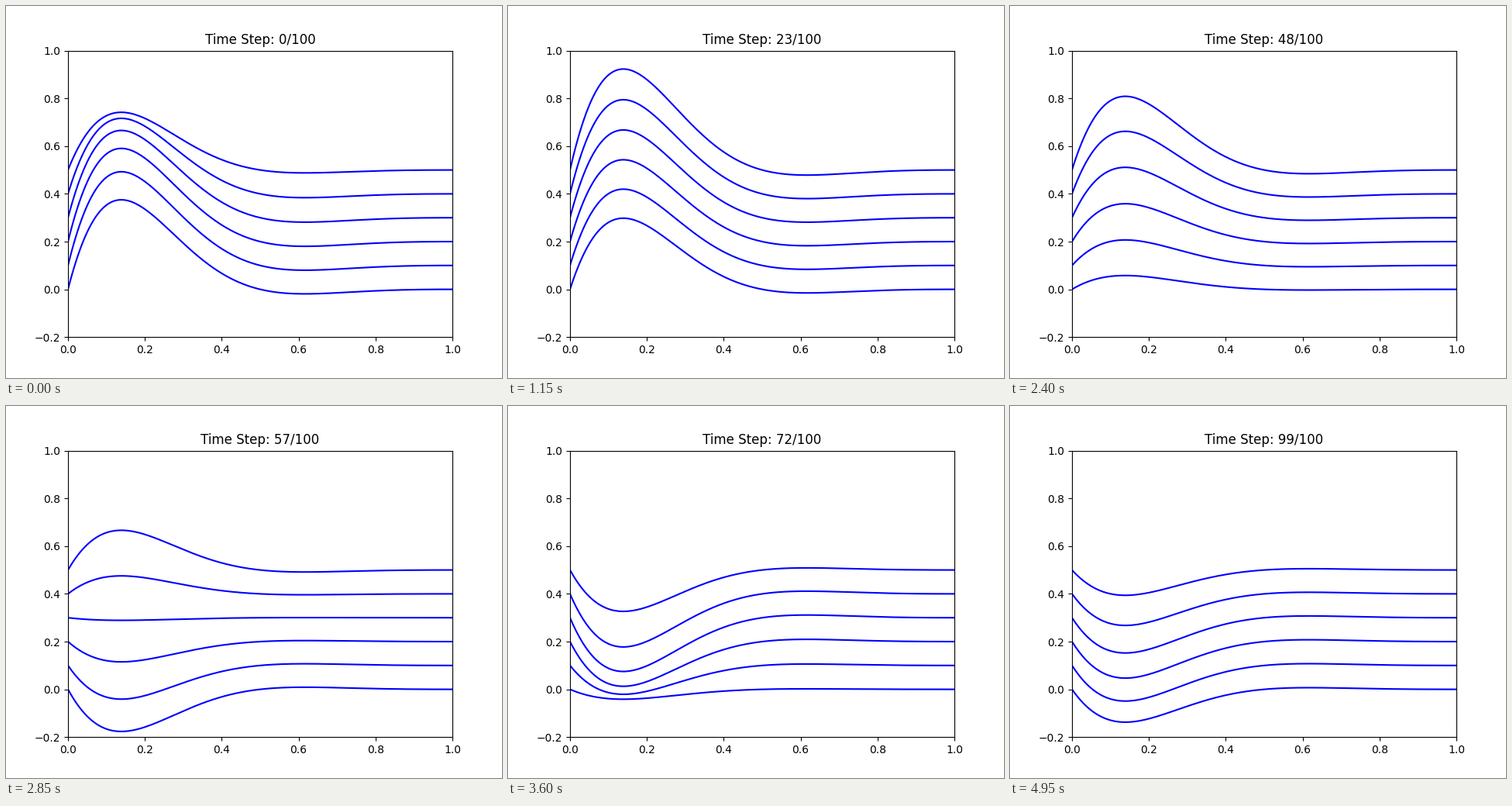
A matplotlib script for the animation above (5 s loop, 640x480 px).

```python
import numpy as np
import matplotlib.pyplot as plt
from matplotlib.animation import FuncAnimation

STEPS = 100
INTERVAL = 50
DELAY = 0.7  # time lag per unit of height

x = np.linspace(0, 1, 200)
profile = np.sin(2 * np.pi * x) * np.exp(-5 * x) * (1 - x**2)
levels = np.arange(6) * 0.1


def amplitude(t, level):
    """Damped wave with a slowly modulated frequency, delayed by height."""
    lag = t - DELAY * level
    omega = np.pi * (1 - np.sin(2 * np.pi * t))
    return np.exp(-lag) * np.cos(omega * lag)


fig, ax = plt.subplots(figsize=(6.4, 4.8), dpi=100)
ax.set_xlim(0, 1)
ax.set_ylim(-0.2, 1)
title = ax.set_title("")
lines = [ax.plot([], [], color="blue", lw=1.5)[0] for _ in levels]


def update(step):
    t = step / STEPS
    for line, level in zip(lines, levels):
        line.set_data(x, level + amplitude(t, level) * profile)
    title.set_text(f"Time Step: {step}/{STEPS}")
    return [*lines, title]


anim = FuncAnimation(fig, update, frames=STEPS, interval=INTERVAL,
                     repeat=True, repeat_delay=0, blit=False)
plt.show()
```
